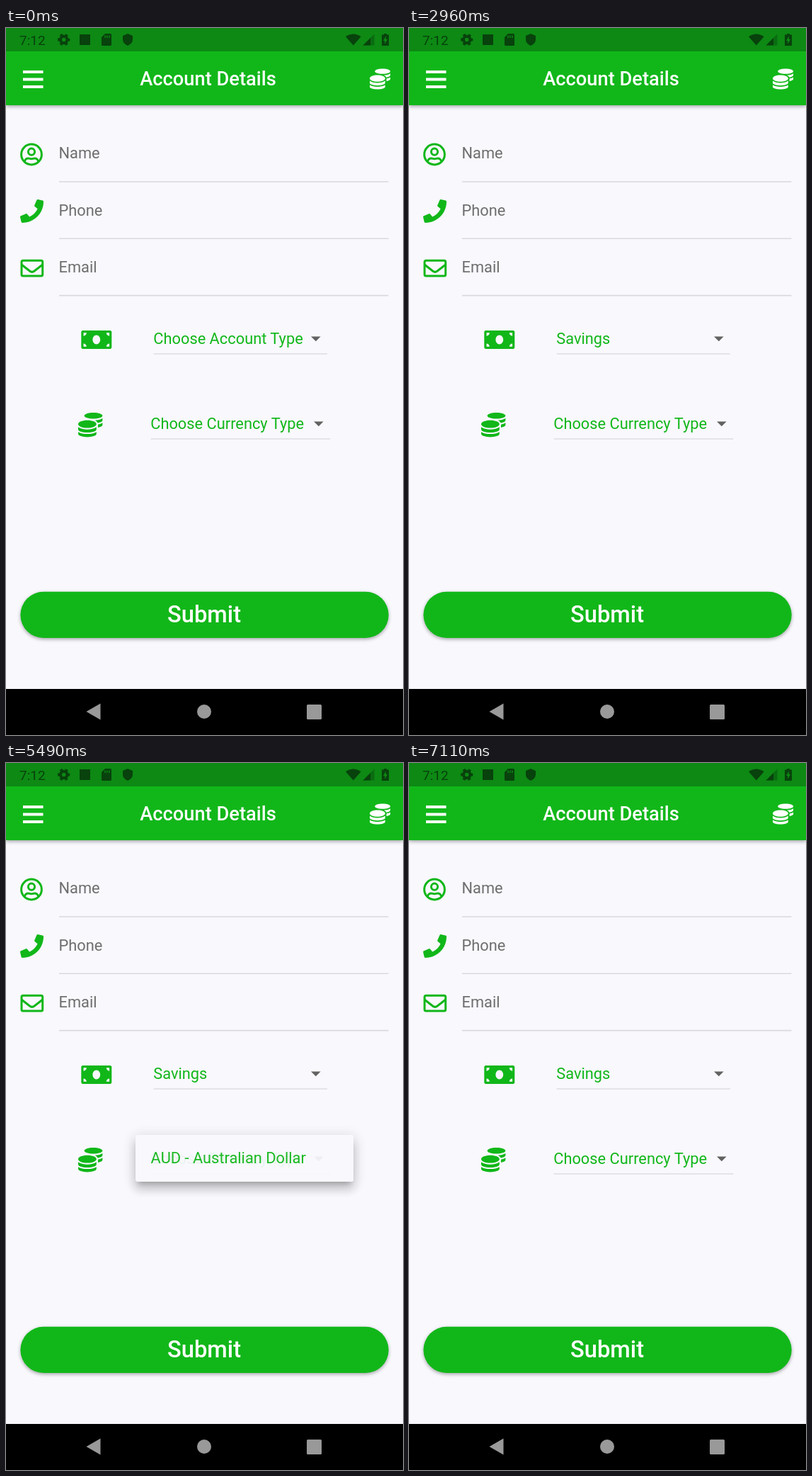
Recreate the animation shown at these times as an HTML page. Size 561 by 998 pixels, loop 7.47 s.

```html
<!DOCTYPE html>
<html lang="en">
<head>
<meta charset="utf-8">
<title>Account Details</title>
<style>
  :root { --green: #11b719; --page: #f8f8fd; }
  html, body { margin: 0; width: 100%; height: 100%; overflow: hidden; background: var(--page); }
  body { position: relative; font: 21.82px Roboto, sans-serif; color: var(--green); }
  svg { position: absolute; left: 0; top: 0; }
  .menu { position: absolute; inset: 0; opacity: 0; }
  .panel {
    position: absolute; border-radius: 2.7px; background: var(--page);
    box-shadow: 0 7px 7px -4px #0003, 0 11px 14px 1px #00000024, 0 4px 19px 4px #0000001f;
  }
  .item { position: absolute; line-height: 65.45px; white-space: pre; }
  .bar { filter: drop-shadow(0 2px 2.5px #0005); }
  .label { fill: #6e6e6e; }
  .rule { stroke: #dadade; stroke-width: 1.6; }
  .title { fill: #fff; font-weight: 500; text-anchor: middle; }
  .status { fill: #08420c; }
</style>
</head>
<body>
<svg width="561" height="998" viewBox="0 0 561 998" fill="#11b719">
  <defs>
    <path id="coins" d="M0 405.3V448c0 35.3 86 64 192 64s192-28.7 192-64v-42.7C342.7 434.4 267.2 448 192 448S41.3 434.4 0 405.3zM320 128c106 0 192-28.7 192-64S426 0 320 0 128 28.7 128 64s86 64 192 64zM0 300.4V352c0 35.3 86 64 192 64s192-28.7 192-64v-51.6c-41.3 34-116.9 51.6-192 51.6S41.3 334.4 0 300.4zm416 11c57.3-11.1 96-31.7 96-55.4v-42.7c-23.2 16.4-57.3 27.6-96 34.5zM192 160C86 160 0 195.8 0 240s86 80 192 80 192-35.8 192-80-86-80-192-80zm219.3 56.3c60-10.8 100.7-32 100.7-56.3v-42.7c-35.5 25.1-96.5 38.6-160.7 41.8 29.5 14.3 51.2 33.5 60 57.2z"/>
    <path id="arrow" d="M0 0h13.6l-6.8 6.8z" fill="#626262"/>
  </defs>
  <rect width="561" height="998" fill="#f8f8fd"/>

  <rect class="bar" width="561" height="109"/>
  <rect width="561" height="33" fill="#0d8914"/>
  <g class="status">
    <text x="19" y="23.5" font-size="19">7:12</text>
    <g fill="none" stroke="#08420c">
      <circle cx="81.7" cy="16.5" r="4.7" stroke-width="4"/>
      <circle cx="81.7" cy="16.5" r="7.3" stroke-width="2.6" stroke-dasharray="4 3.64" stroke-dashoffset="2"/>
    </g>
    <rect x="104" y="9" width="15" height="15"/>
    <path d="M140 8h7.5q1.5 0 1.5 1.5v14q0 1.5-1.5 1.5h-11q-1.5 0-1.5-1.5V13z"/>
    <path d="M140 10.5v3.5m3-3.5v3.5m3-3.5v3.5" stroke="#0d8914" stroke-width="1.4"/>
    <path d="M172 8l7 3v5q0 6-7 9-7-3-7-9v-5z"/>
    <path d="M480 12.3q10.700-7.500 21.500 0L490.800 24.500z"/>
    <path d="M504.500 24.500L520.500 8.500v16z" opacity=".4"/>
    <path d="M504.500 24.500L515 14v10.500z"/>
    <path d="M534 8h4v1.500h3V25h-10V9.500h3z"/>
    <path d="M536.800 11.500v4.500h2.200l-3.800 6.500v-4.500h-2.200z" fill="#0d8914"/>
  </g>

  <path d="M24 62h28.500M24 72.500h28.500M24 83h28.500" stroke="#fff" stroke-width="4"/>
  <text class="title" x="285.500" y="81" font-size="27.27">Account Details</text>
  <use href="#coins" fill="#fff" transform="translate(514 57.500) scale(.0568)"/>

  <g fill="none" stroke="#11b719" stroke-width="3">
    <circle cx="36" cy="178.500" r="14.400"/>
    <circle cx="36" cy="174.700" r="4.600"/>
    <path d="M26.300 188.500c.8-3.500 3.200-4.500 5.200-4.500 1.700 0 2.700.8 4.500.8s2.800-.8 4.500-.8c2 0 4.400 1 5.200 4.500"/>
    <rect x="22" y="328.200" width="29.700" height="21.800" rx="2"/>
    <path d="M22 334l11.800 9.300q3 2.200 6 0L51.700 334"/>
  </g>
  <path transform="translate(20 242) scale(.0645)" d="M493.4 24.6l-104-24c-11.3-2.6-22.9 3.3-27.500 13.900l-48 112c-4.200 9.800-1.400 21.300 6.900 28l60.600 49.600c-36 76.700-98.900 140.500-177.200 177.200l-49.600-60.600c-6.800-8.300-18.200-11.100-28-6.900l-112 48C3.900 366.500-2 378.100.6 389.400l24 104C27.100 504.200 36.700 512 48 512c256.100 0 464-207.500 464-464 0-11.200-7.700-20.900-18.600-23.400z"/>
  <g class="label">
    <text x="74.500" y="184">Name</text>
    <text x="74.500" y="264.700">Phone</text>
    <text x="74.500" y="345.300">Email</text>
  </g>
  <path class="rule" d="M75 217h465.500M75 297.200h465.500M75 377.600h465.500"/>

  <path transform="translate(106.300 422.800) scale(.0672)" d="M608 64H32C14.300 64 0 78.300 0 96v320c0 17.700 14.300 32 32 32h576c17.700 0 32-14.300 32-32V96c0-17.700-14.300-32-32-32zM48 400v-64c35.300 0 64 28.700 64 64zm0-224v-64h64c0 35.300-28.700 64-64 64zm272 176c-44.200 0-80-43-80-96s35.800-96 80-96 80 43 80 96-35.800 96-80 96zm272 48h-64c0-35.300 28.700-64 64-64zm0-224c-35.300 0-64-28.700-64-64h64z"/>
  <use href="#coins" transform="translate(102 543) scale(.0672)"/>
  <text id="account" x="208.300" y="445.800"></text>
  <text x="204.200" y="565.800">Choose Currency Type</text>
  <use href="#arrow" x="431" y="435.400"/>
  <use href="#arrow" x="435" y="555.400"/>
  <path class="rule" d="M208.500 460H454M204.500 580H458.300" stroke-opacity=".85"/>

  <rect class="bar" x="20.400" y="795.700" width="520.300" height="65.400" rx="32.700"/>
  <text class="title" x="280" y="839.300" font-size="32.73">Submit</text>

  <rect y="933" width="561" height="65" fill="#000"/>
  <g fill="#999">
    <path d="M113.500 965l20-11.500v23z"/>
    <circle cx="280" cy="965" r="10"/>
    <rect x="425" y="955" width="21" height="21" rx="1.500"/>
  </g>
</svg>
<script>
  const LOOP = 7470, ROW = 65.45, PAD = 11;
  const clamp = v => Math.min(1, Math.max(0, v));
  const ramp = (v, from, to) => clamp((v - from) / (to - from));

  function addDiv(parent, className, text = '') {
    const el = document.createElement('div');
    el.className = className;
    el.textContent = text;
    parent.append(el);
    return el;
  }

  function createMenu(left, top, width, names) {
    const root = addDiv(document.body, 'menu');
    const panel = addDiv(root, 'panel');
    panel.style.left = left + 'px';
    panel.style.width = width + 'px';
    const items = names.map((name, i) => {
      const item = addDiv(root, 'item', name);
      item.style.left = left + 21.6 + 'px';
      item.style.top = top + i * ROW + 'px';
      return item;
    });
    const unit = 0.5 / (names.length + 1.5);

    // Fade in, grow out of the first row, then reveal the other rows in turn.
    return (progress, alpha) => {
      const grow = ramp(progress, 0.25, 0.5);
      root.style.opacity = alpha * ramp(progress, 0, 0.25);
      panel.style.top = top - PAD * grow + 'px';
      panel.style.height = ROW + ((names.length - 1) * ROW + 2 * PAD) * grow + 'px';
      items.forEach((item, i) => {
        const start = 0.5 + (i + 1) * unit;
        item.style.opacity = i ? ramp(progress, start, start + 1.5 * unit) : 1;
      });
    };
  }

  const menus = {
    account: createMenu(187, 405.4, 300, ['Savings', 'Deposit', 'Checking', 'Brokerage']),
    currency: createMenu(183, 525.4, 308, [
      'AUD - Australian Dollar', 'CAD - Canadian Dollar', 'EUR - Euro',
      'GBP - British Pound', 'USD - US Dollar'])
  };

  // [time, open menu, opening progress, closing alpha]
  const steps = [
    [0], [2280, 'account', 0.5], [2350, 'account', 0.77], [2420, 'account', 1], [2960],
    [3800, 'account', 0.1], [3840, 'account', 0.23], [4620, 'account', 1],
    [4730, 'account', 1, 0.5], [4790],
    [5490, 'currency', 0.235], [5570, 'currency', 0.5], [5650, 'currency', 0.77],
    [5730, 'currency', 0.985], [6910, 'currency', 1],
    [7010, 'currency', 1, 0.8], [7060, 'currency', 1, 0.35], [7110]
  ];
  const account = document.getElementById('account');

  function render(now) {
    const time = now % LOOP;
    const [, open, progress, alpha = 1] = steps.findLast(step => step[0] <= time);
    for (const name in menus) menus[name](name === open ? progress : 0, alpha);
    account.textContent = time < 2960 ? 'Choose Account Type' : 'Savings';
    requestAnimationFrame(() => render(performance.now()));
  }
  render(0);
</script>
</body>
</html>
```
